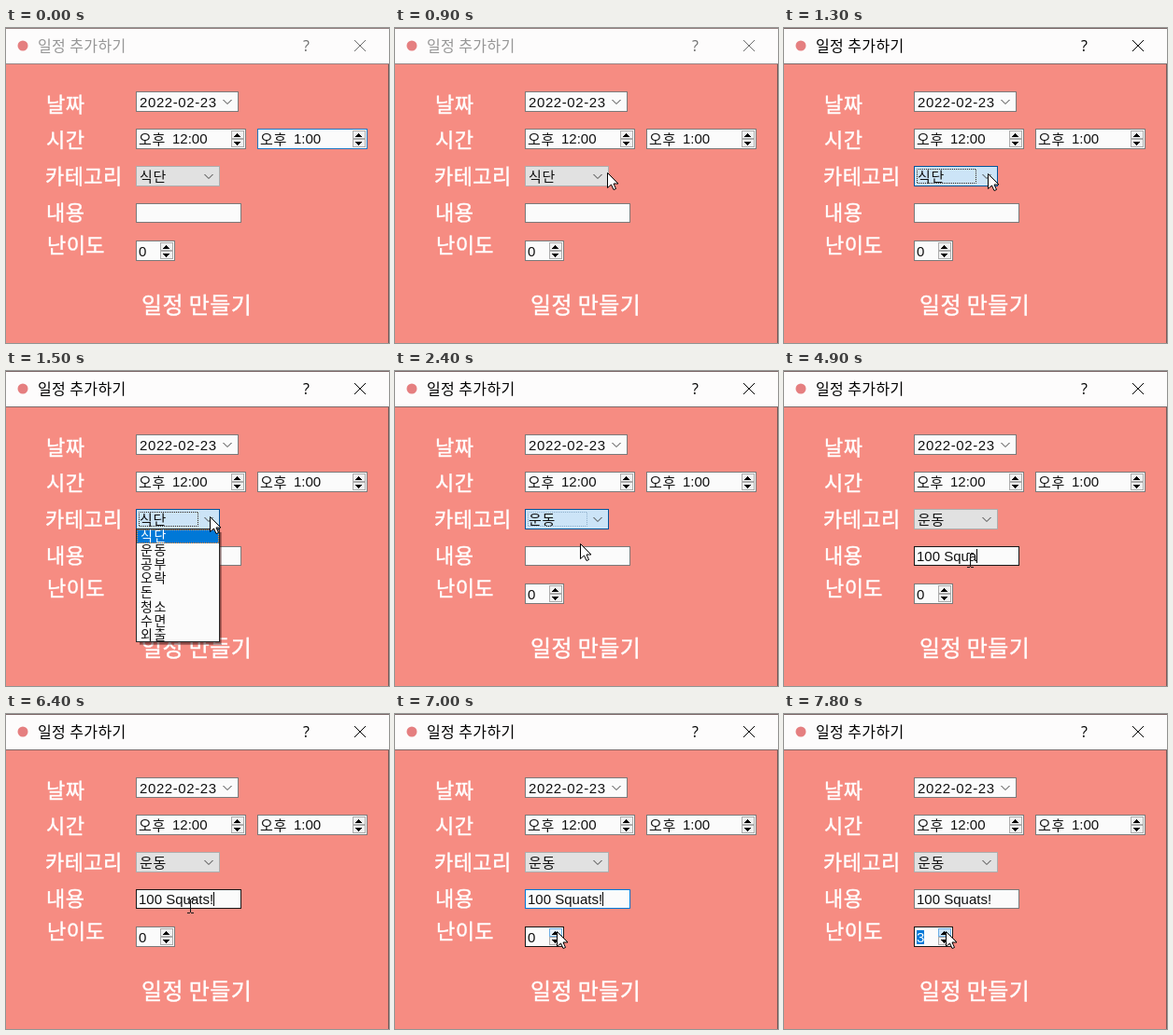
Recreate the animation shown at these times as an HTML page with a canvas. Size 410 px wide and 338 px high, loop 8000 ms.

```html
<!DOCTYPE html>
<html lang="ko">
<head>
<meta charset="utf-8">
<style>
html, body { margin: 0; width: 100%; height: 100%; overflow: hidden; background: #f68c82; }
canvas { display: block; }
</style>
</head>
<body>
<canvas id="stage" width="410" height="338"></canvas>
<script>
const ctx = document.getElementById('stage').getContext('2d');
const LOOP = 8000, STEP = 100;
const HANGUL = '"Noto Sans CJK KR", "Noto Sans CJK", sans-serif';
const LATIN = '"Liberation Sans", "Noto Sans CJK KR", sans-serif';
const PINK = [246, 140, 130], WHITE = [255, 255, 255], PAPER = [251, 251, 251], GRAY = [122, 122, 122];
const INK = [16, 16, 16], DARK = [23, 23, 23], BLUE = [0, 120, 215], NAVY = [0, 84, 153];
const FACE = [225, 225, 225], EDGE = [173, 173, 173], BUTTON = [240, 240, 240];
const HOVER = [229, 241, 251], PRESSED = [204, 228, 247], HOT_EDGE = [110, 175, 230];

const CATEGORIES = ['식단', '운동', '공부', '오락', '돈', '청소', '수면', '외출'];
const TYPED = '100 Squats!';
const KEY_TIMES = [3300, 3400, 3500, 3700, 4100, 4400, 4800, 4900, 5400, 5500, 5900];
const CLICK_TIMES = [7300, 7600, 7800];

// Pointer path: time, x, y
const PATH = [
  [600, 303, 157], [700, 279, 156], [800, 249, 155], [900, 227, 155], [1100, 218, 156],
  [1500, 218, 156], [1900, 198, 185], [2400, 198, 185], [2700, 199, 203],
  [6300, 199, 203], [6500, 195, 208], [6900, 173, 233]
];

const css = c => `rgb(${c.map(Math.round)})`;
const mix = (a, b, k) => a.map((v, i) => v + (b[i] - v) * k);
const progress = (t, from, to) => Math.min(1, Math.max(0, (t - from) / (to - from)));
const fade = (t, from, to, a, b) => mix(a, b, progress(t, from, to));

function rect(x, y, w, h, color) {
  ctx.fillStyle = css(color);
  ctx.fillRect(x, y, w, h);
}

function box(x, y, w, h, border, fill = PAPER) {
  rect(x, y, w, h, border);
  rect(x + 1, y + 1, w - 2, h - 2, fill);
}

function write(text, x, middle, size, { color = INK, family = HANGUL, weight = 300, spacing = 0.4, outline = 0 } = {}) {
  ctx.font = `${weight} ${size}px ${family}`;
  ctx.letterSpacing = spacing + 'px';
  ctx.fillStyle = ctx.strokeStyle = css(color);
  const baseline = Math.round(middle + size * 0.37);
  ctx.fillText(text, x, baseline);
  if (!outline) return;
  ctx.lineWidth = outline;
  ctx.strokeText(text, x, baseline);
}

const value = (text, x, middle, options) => write(text, x, middle, 15, { family: LATIN, spacing: 0, ...options });
const word = (text, x, middle, color) => write(text, x, middle, 15, { color, spacing: 0.8 });

function stroke(points, color) {
  ctx.beginPath();
  points.forEach(([x, y]) => ctx.lineTo(x, y));
  ctx.strokeStyle = css(color);
  ctx.lineWidth = 1;
  ctx.stroke();
}

const chevron = (x, y) => stroke([[x - 4.5, y - 2], [x, y + 2.5], [x + 4.5, y - 2]], [60, 60, 60]);

function focusRect(x, y, w, h, color) {
  ctx.setLineDash([1, 1]);
  ctx.lineDashOffset = 0.5;
  ctx.strokeStyle = css(color);
  ctx.lineWidth = 1;
  ctx.strokeRect(x + 0.5, y + 0.5, w - 1, h - 1);
  ctx.setLineDash([]);
}

function spinButtons(x, y, upBorder = EDGE, upFill = BUTTON) {
  box(x, y, 14, 9, upBorder, upFill);
  box(x, y + 9, 14, 9, EDGE, BUTTON);
  for (let i = 0; i < 4; i++) {
    rect(x + 6 - i, y + 3 + i, 1 + 2 * i, 1, [0, 0, 0]);
    rect(x + 6 - i, y + 15 - i, 1 + 2 * i, 1, [0, 0, 0]);
  }
}

function timeField(x, time, border) {
  box(x, 108, 118, 22, border);
  word('오후', x + 3, 119);
  value(time, x + 39, 118);
  spinButtons(x + 102, 110);
}

function titleBar(active) {
  rect(0, 0, 410, 39, active ? [125, 105, 105] : [150, 130, 130]);
  rect(0, 1, 410, 37, [253, 252, 252]);
  ctx.beginPath();
  ctx.arc(18, 19, 5.5, 0, 7);
  ctx.fillStyle = '#e57f80';
  ctx.fill();
  write('일정 추가하기', 34, 19, 16, { color: active ? [0, 0, 0] : [150, 150, 150] });
  const icon = active ? [0, 0, 0] : [110, 110, 110];
  write('?', 318, 19, 16, { color: icon, family: '"Open Sans", sans-serif', weight: 400 });
  stroke([[373, 13], [385, 25]], icon);
  stroke([[385, 13], [373, 25]], icon);
}

function labels() {
  const white = { color: WHITE, weight: 500, outline: 0.4 };
  [['날짜', 43, 82], ['시간', 43, 120], ['카테고리', 42, 159], ['내용', 43, 198], ['난이도', 44, 233]]
    .forEach(([text, x, y]) => write(text, x, y, 22, white));
  write('일정 만들기', 145, 297, 24, white);
}

function categoryBox(t) {
  let fill = fade(t, 900, 1100, FACE, HOVER);
  let border = fade(t, 900, 1100, EDGE, BLUE);
  if (t >= 1300) {
    fill = fade(t, 2400, 2800, PRESSED, FACE);
    border = fade(t, 2400, 2800, NAVY, EDGE);
  }
  box(139, 148, 90, 22, border, fill);
  word(CATEGORIES[t < 2400 ? 0 : 1], 143, 159);
  chevron(217, 159);
  if (t >= 1300 && t < 3000) focusRect(142, 151, 64, 16, t < 2400 ? [50, 40, 30] : [143, 176, 204]);
}

function contentField(t) {
  let border = fade(t, 2400, 2800, GRAY, DARK);
  if (t >= 6400) border = t < 7200 ? fade(t, 6400, 6800, DARK, BLUE) : GRAY;
  box(139, 188, 113, 21, border);
  const text = TYPED.slice(0, KEY_TIMES.filter(k => k <= t).length);
  value(text, 142, 198);
  if (t >= 3000 && t < 7200) rect(142 + Math.floor(ctx.measureText(text).width), 191, 1, 15, [0, 0, 0]);
}

function difficultyField(t) {
  const lit = progress(t, 6600, 6900);
  box(139, 228, 42, 22, mix(GRAY, DARK, lit));
  const selected = t >= 7200;
  if (selected) rect(142, 232, 8, 15, BLUE);
  const count = CLICK_TIMES.filter(c => c <= t).length;
  value(count, 142, 239, { color: selected ? WHITE : INK });
  spinButtons(165, 230, mix(EDGE, HOT_EDGE, lit), mix(BUTTON, selected ? PRESSED : HOVER, lit));
}

function dropdown(t, pointerY) {
  if (t < 1400 || t >= 2400) return;
  const height = t < 1500 ? 62 : 122, rowHeight = 15.1;
  const current = pointerY >= 184 ? 1 : 0;
  ctx.fillStyle = 'rgba(60,20,20,.35)';
  ctx.fillRect(143, 173, 88, height - 1);
  ctx.fillRect(143, 173, 87, height - 2);
  box(139, 169, 90, height, [40, 40, 40]);
  ctx.save();
  ctx.beginPath();
  ctx.rect(140, 170, 88, height - 2);
  ctx.clip();
  CATEGORIES.forEach((name, i) => {
    const top = Math.round(170 + i * rowHeight), isCurrent = i === current;
    if (isCurrent) {
      rect(140, top, 88, 15, BLUE);
      focusRect(140, top, 88, 15, [255, 135, 40]);
    }
    write(name, 144, top + 7, 14, { color: isCurrent ? WHITE : INK, spacing: 1.6 });
  });
  ctx.restore();
}

function pointerAt(t) {
  const next = PATH.findIndex(p => p[0] > t);
  if (next < 0) return PATH[PATH.length - 1].slice(1);
  const a = PATH[next - 1], b = PATH[next];
  return mix(a, b, progress(t, a[0], b[0])).slice(1).map(Math.round);
}

function arrow(x, y) {
  ctx.beginPath();
  [[0, 0], [0, 16], [4, 12.5], [6.5, 18], [9, 17], [6.5, 11.5], [11.5, 11.5]]
    .forEach(([dx, dy]) => ctx.lineTo(x + dx + 0.5, y + dy + 0.5));
  ctx.closePath();
  ctx.fillStyle = '#fff';
  ctx.fill();
  ctx.strokeStyle = '#000';
  ctx.lineWidth = 1;
  ctx.stroke();
}

function textCursor(x, y) {
  rect(x, y - 7, 1, 14, DARK);
  for (const dy of [-8, 7]) {
    rect(x - 3, y + dy, 3, 1, DARK);
    rect(x + 1, y + dy, 3, 1, DARK);
  }
}

function draw(t) {
  rect(0, 0, 410, 338, PINK);
  titleBar(t >= 1300);
  rect(409, 39, 1, 299, [120, 90, 88]);
  labels();
  box(139, 68, 110, 22, GRAY);
  value('2022-02-23', 143, 79, { spacing: 0.6 });
  chevron(237, 79);
  timeField(139, '12:00', GRAY);
  timeField(269, '1:00', fade(t, 0, 200, [30, 120, 195], GRAY));
  categoryBox(t);
  contentField(t);
  difficultyField(t);
  if (t < 600) return;
  const [x, y] = pointerAt(t);
  dropdown(t, y);
  const overText = t > 2400 && y > 188 && y < 208;
  (overText ? textCursor : arrow)(x, y);
}

const start = performance.now();
function tick() {
  const t = (performance.now() - start) % LOOP;
  draw(Math.floor(t / STEP) * STEP);
  requestAnimationFrame(tick);
}
tick();
</script>
</body>
</html>
```
